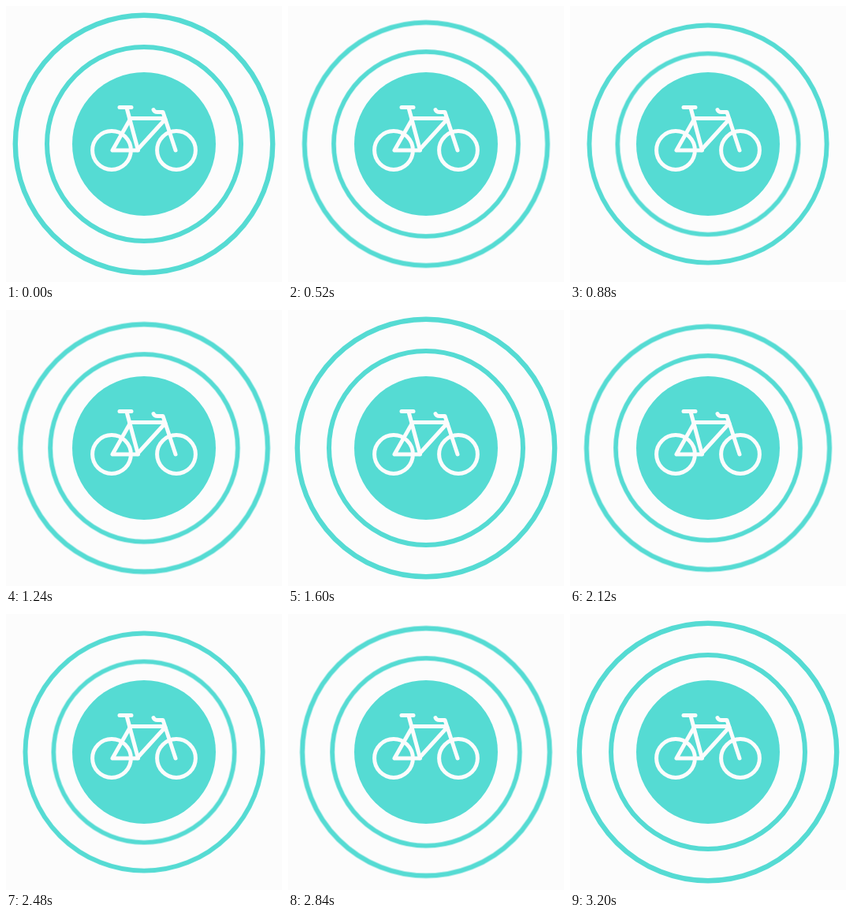
Recreate the animation shown at these times as an HTML page. Size 350 by 350 pixels, loop 3.24 s.

```html
<!DOCTYPE html>
<html lang="en">
<head>
<meta charset="utf-8">
<title>Pulsing bicycle badge</title>
<style>
  html, body { margin: 0; width: 100%; height: 100%; overflow: hidden; background: #fcfcfc; }
  svg { display: block; width: 100%; height: 100%; }
  .ring {
    fill: none;
    stroke: #55dbd3;
    transform-origin: 175px 175px;
    /* 20 steps of 40 ms per half pulse; the small lead keeps steps off exact boundaries */
    animation: pulse 3240ms steps(20, end) -4ms infinite;
  }
  .outer { --small: .914; stroke-width: 6.4; }
  .inner { --small: .925; stroke-width: 6; }
  .bike { fill: none; stroke: #fcfcfc; stroke-width: 5; stroke-linecap: round; stroke-linejoin: round; }

  /* two 1600 ms pulses, then a 40 ms hold */
  @keyframes pulse {
    0%, 49.3827%, 98.7654%, 100% { transform: scale(1); }
    24.6914%, 74.0741% { transform: scale(var(--small)); }
  }
</style>
</head>
<body>
<svg viewBox="0 0 350 350">
  <circle class="ring outer" cx="175" cy="175" r="163.2"/>
  <circle class="ring inner" cx="175" cy="175" r="123"/>
  <circle cx="175" cy="175" r="91" fill="#55dbd3"/>
  <g class="bike">
    <circle cx="134" cy="183" r="24.4"/>
    <circle cx="216" cy="183" r="24.4"/>
    <path d="M144 128.5H159M153 129L167.5 183"/>
    <path d="M158 142.5L135 183H166L202 143.5M157 142.5H201"/>
    <path d="M187 131.5Q188 134.5 192 134.5H199L215 183"/>
  </g>
</svg>
</body>
</html>
```
